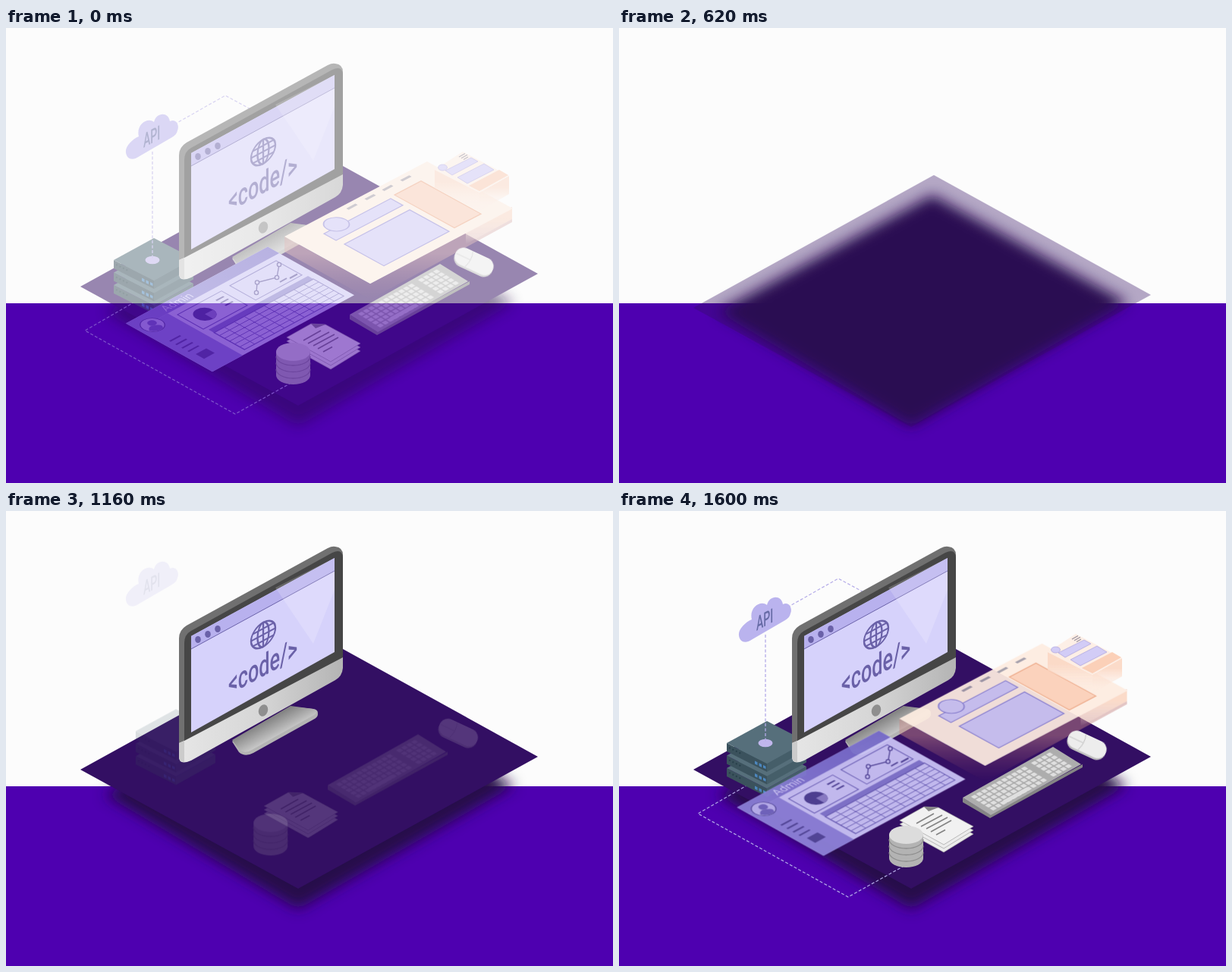
An HTML page without scripts that plays this animation: 800 px wide and 600 px high, repeating every 1650 ms.

```html
<!DOCTYPE html>
<html lang="en">
<head>
<meta charset="utf-8">
<title>Isometric desk</title>
<style>
  html, body { margin: 0; width: 100%; height: 100%; overflow: hidden; background: #fcfcfc; }
  svg { display: block; width: 100%; height: 100%; }
  text { font-family: Roboto, "Liberation Sans", sans-serif; }

  .scene, .shadow, .plate, .monitor, .item, .panel, .dash {
    animation: 1.65s linear infinite;
  }
  .scene { animation-name: leave; }
  .shadow { animation-name: shade; }
  .plate { animation-name: rise; }
  .monitor { --x: -40px; --y: -24.5px; animation-name: monitor; }
  .item { animation-name: item; }
  .panel { animation-name: panel; }
  .dash { animation-name: dash; }

  @keyframes leave {
    0% { opacity: .5; }
    1.82% { opacity: .36; }
    5.45% { opacity: .17; }
    9.1% { opacity: .06; }
    12.7%, 14.9% { opacity: 0; }
    15%, 100% { opacity: 1; }
  }
  @keyframes shade {
    0%, 14.9% { opacity: 1; }
    15%, 26.7% { opacity: 0; }
    36.4%, 100% { opacity: 1; }
  }
  @keyframes rise {
    0%, 14.9% { opacity: 1; transform: none; }
    15%, 35.7% { opacity: 0; transform: translateY(29.5px); }
    36.4% { opacity: .15; transform: translateY(29.5px); animation-timing-function: ease-in-out; }
    40% { opacity: 1; transform: translateY(23px); animation-timing-function: ease-out; }
    50.3%, 100% { opacity: 1; transform: none; }
  }
  @keyframes monitor {
    0%, 14.9% { opacity: 1; transform: none; }
    15%, 50.3% { opacity: 0; transform: translate(var(--x), var(--y)); animation-timing-function: ease-in-out; }
    65.5%, 100% { opacity: 1; transform: none; }
  }
  @keyframes item {
    0%, 14.9% { opacity: 1; transform: none; }
    15%, 66.7% { opacity: 0; transform: translate(var(--x), var(--y)); animation-timing-function: ease-in-out; }
    79.4%, 100% { opacity: 1; transform: none; }
  }
  @keyframes panel {
    0%, 14.9% { opacity: 1; transform: none; }
    15%, 83% { opacity: 0; transform: translate(var(--x), var(--y)); animation-timing-function: ease-in-out; }
    100% { opacity: 1; transform: none; }
  }
  @keyframes dash {
    0%, 14.9% { opacity: 1; }
    15%, 89% { opacity: 0; }
    97%, 100% { opacity: 1; }
  }
</style>
</head>
<body>
<svg viewBox="0 0 800 600" preserveAspectRatio="none">
  <defs>
    <clipPath id="stage"><path d="M0 46H800V600H0z"/></clipPath>
    <filter id="soft" x="-10%" y="-10%" width="120%" height="120%"><feGaussianBlur stdDeviation="9"/></filter>
    <linearGradient id="chin"><stop stop-color="#e6e6e6"/><stop offset=".5" stop-color="#d6d6d6"/><stop offset="1" stop-color="#b4b4b4"/></linearGradient>
    <linearGradient id="foot" gradientUnits="userSpaceOnUse" x1="345" y1="272" x2="360" y2="300">
      <stop stop-color="#7c7c7c"/><stop offset="1" stop-color="#d2d2d2"/>
    </linearGradient>
    <linearGradient id="admin"><stop stop-color="#8d82d8"/><stop offset="1" stop-color="#7468c8"/></linearGradient>
    <linearGradient id="edge" x2="0" y2="1">
      <stop offset=".5" stop-color="#c98a88" stop-opacity=".5"/><stop offset="1" stop-color="#8a3f60" stop-opacity="0"/>
    </linearGradient>
    <linearGradient id="peach" x2="0" y2="1">
      <stop offset=".3" stop-color="#fbd9c6"/><stop offset="1" stop-color="#fde9de" stop-opacity="0"/>
    </linearGradient>
    <pattern id="cells" width="13.1" height="6.7" patternUnits="userSpaceOnUse" x="48" y="68">
      <path d="M0 0H13.1M0 0V6.7" fill="none" stroke="#6c61b8" stroke-width="1.6"/>
    </pattern>
    <pattern id="keys" width="6.6" height="6.2" patternUnits="userSpaceOnUse" x="6" y="3.5">
      <rect x=".6" y=".6" width="5" height="4.6" rx=".8" fill="#dfdfdf"/>
    </pattern>
    <g id="slab">
      <path d="M142 306L195 333V344L142 317z" fill="#3b525d"/>
      <path d="M247 304L195 333V344L247 315z" fill="#455e69"/>
      <path d="M142 306L195 277L247 304L195 333z" fill="#566f7b"/>
      <path d="M179 329.500l3.500 1.800v4l-3.500-1.800zM184.500 332.300l3.500 1.800v4l-3.500-1.800zM190 335l3.500 1.800v3.500l-3.500-1.800z" fill="#4c86bd"/>
      <path d="M145 312l16 8" stroke="#28404a" stroke-width="2" stroke-dasharray="2 3"/>
    </g>
    <path id="sheet" d="M370 408L402 390L421 391L467 416L428 440z"/>
  </defs>

  <rect width="800" height="600" fill="#fcfcfc"/>
  <rect y="363" width="800" height="237" fill="#4e00b0"/>

  <g clip-path="url(#stage)">
  <g class="scene">
    <path class="shadow" d="M130 374L413 220L670 362L385 525z" fill="#270c48" filter="url(#soft)"/>
    <path class="plate" d="M98 341L415 166L701 324L385 498z" fill="#330f63"/>

    <g class="dash" fill="none" stroke="#b4abe8" stroke-width="1.2" stroke-dasharray="4 2.500">
      <path d="M222 127L289 89L326 109M170 361L104 399L302 509L374 469"/>
    </g>

    <g class="item" style="--x:35px;--y:-19px">
      <use href="#slab" y="33"/>
      <use href="#slab" y="16.500"/>
      <use href="#slab"/>
    </g>

    <g class="dash">
      <ellipse cx="193" cy="306" rx="9.500" ry="5.200" fill="#c0b6ec"/>
      <path d="M193 163V305" stroke="#b4abe8" stroke-width="1.300" stroke-dasharray="4 2.500"/>
    </g>

    <g class="item" style="--x:0px;--y:-57px">
      <path d="M158 164C157 156 166 147 175 143C171 127 187 117 195 124C198 111 214 110 216 123C224 119 229 128 226 135C225 140 222 142 219 144L176 169C168 175 159 174 158 164z" fill="#bab3ee"/>
      <text transform="matrix(.54 -.29 0 1 181 158)" font-size="26" font-weight="500" fill="#676ba6">API</text>
    </g>

    <g class="monitor">
      <path d="M298 304L375 258L405 261Q412 262 411 268Q411 272 405 275L326 319Q315 325 307 318z" fill="#b4b4b4"/>
      <path d="M298 302L375 257L405 261Q413 264 406 269L324 315Q314 321 307 314z" fill="url(#foot)"/>
      <path d="M228 312V168Q228 157 238 151L424 49Q430 46 434 47Q444 48 444 58V196z" fill="#707070"/>
      <path d="M235 307V174Q235 163 244 158L430 55Q443 49 444 61V196z" fill="#464646"/>
      <path d="M228 306L235 303L444 193V207Q443 218 434 223L244 329Q228 336 228 324z" fill="url(#chin)"/>
      <path d="M228 306L235 303V331Q228 331 228 324z" fill="#cbcbcb"/>
      <ellipse cx="339" cy="263" rx="6" ry="8" transform="rotate(20 339 263)" fill="#8f8f8f"/>
      <path d="M244 165L433 62V186L244 292z" fill="#d6d2fb"/>
      <path d="M244 165L433 62V79L244 182z" fill="#b8b1ee"/>
      <path d="M244 182L433 79" stroke="#6c63ab"/>
      <path d="M355 101L405 175L433 104V62z" fill="#fff" opacity=".18"/>
      <g fill="#6a61a8">
        <ellipse cx="253" cy="169.500" rx="3.800" ry="4.500"/>
        <ellipse cx="266" cy="162.500" rx="3.800" ry="4.500"/>
        <ellipse cx="279" cy="155.500" rx="3.800" ry="4.500"/>
        <text transform="matrix(.63 -.343 0 1 293 243)" font-size="40" font-weight="500">&lt;code/&gt;</text>
      </g>
      <g transform="matrix(1 -.545 0 1 339 163)" fill="none" stroke="#6a61a8" stroke-width="2.300">
        <circle r="16"/>
        <ellipse rx="7.500" ry="16"/>
        <path d="M0-16V16M-16 0H16M-13.500-8H13.500M-13.500 8H13.500"/>
      </g>
    </g>

    <g class="panel" style="--x:40px;--y:-20px">
      <path d="M367 275L480 338L667 236V256L480 358L367 295z" fill="url(#edge)"/>
      <path d="M606 269L667 236V252L606 285z" fill="url(#peach)"/>
      <g transform="matrix(1 -.527 1 .55 367 275)" stroke-width="1.300">
        <rect width="188" height="113" fill="#fdece1"/>
        <g fill="#cfc9f6" stroke="#9189d6">
          <rect x="30" y="22" width="88" height="16"/>
          <circle cx="50" cy="18.500" r="12"/>
          <rect x="31" y="48" width="86" height="52"/>
        </g>
        <rect x="125" y="20" width="35" height="79" fill="#fbcfb8" stroke="#eeaa88"/>
        <path d="M76 7h12m12 0h12m11 0h12m12 0h12" stroke="#a29ca8" stroke-width="3.200"/>
      </g>
    </g>

    <g class="panel" style="--x:0px;--y:-16px">
      <path d="M565 187L624 217V241L565 211z" fill="url(#peach)"/>
      <path d="M663 195L624 217V241L663 219z" fill="url(#peach)"/>
      <path d="M565 187L602 163L663 195L624 217z" fill="#fdeee5"/>
      <path d="M610 208L650 187L662 194L624 215z" fill="#fbcdb4"/>
      <g fill="#cfc9f6" stroke="#a59ddd" stroke-width=".7">
        <path d="M579 188L613 171L622 176L588 194zM595 197L630 179L643 187L608 205z"/>
        <ellipse cx="575.500" cy="184" rx="6" ry="4"/>
      </g>
      <path d="M597 170l8-4.500m-5 6.200l8-4.500m-5 6.200l6-3.500" stroke="#918a98" stroke-width="1.200"/>
    </g>

    <g class="panel" style="--x:-40px;--y:22px">
      <g transform="matrix(1 -.54 1 .56 158 389.500)">
        <rect width="187" height="114" fill="#cbc5f7"/>
        <rect width="187" height="15" fill="url(#admin)"/>
        <rect y="15" width="40" height="99" fill="#8f84da"/>
        <text x="41" y="12" font-size="13" fill="#d3ccfa">Admin</text>
        <g fill="none" stroke="#6c61b8" stroke-width="1.100">
          <rect x="45" y="23" width="58" height="34"/>
          <rect x="115" y="22" width="61" height="34"/>
        </g>
        <circle cx="16" cy="19" r="11.500" fill="#bdb5f0" stroke="#5a4f9e"/>
        <circle cx="18" cy="16.500" r="4.500" fill="#7468c0"/>
        <path d="M7 24Q11 17 18 21.500Q24 25 19 30Q11 31 7 24z" fill="#7468c0"/>
        <circle cx="64" cy="40" r="11" fill="#4f4394"/>
        <path d="M64 40L75 40A11 11 0 0 1 64 51z" fill="#8d81c8"/>
        <path d="M88 31h10M88 37h10M88 43h10M8 50h14M8 58h14M8 66h14M8 74h14" stroke="#55499a" stroke-width="2"/>
        <rect x="10" y="82" width="14" height="11" fill="#55499a"/>
        <rect x="48" y="61" width="131" height="7" fill="#8378cd"/>
        <rect x="48" y="68" width="131" height="40.200" fill="url(#cells)"/>
        <rect x="48" y="68" width="131" height="40.200" fill="none" stroke="#6c61b8"/>
      </g>
      <g stroke="#55499a" fill="none" stroke-width="1.400">
        <path d="M330 349L331 335.500L357 329L360 312"/>
        <path d="M361 335l9-5m4 0l10-5.500" stroke-width="2"/>
        <g fill="#cbc5f7">
          <circle cx="330" cy="349" r="2.600"/><circle cx="331" cy="335.500" r="2.600"/>
          <circle cx="357" cy="329" r="2.600"/><circle cx="360" cy="312" r="2.600"/>
        </g>
      </g>
    </g>

    <g class="item" style="--x:-35px;--y:-20px">
      <path d="M453 378L489 400L611 334V338L489 405L453 384z" fill="#858585"/>
      <g transform="matrix(1 -.563 1 .62 453 378)">
        <rect width="119" height="37" fill="#adadad"/>
        <rect x="6" y="3.500" width="72.600" height="31" fill="url(#keys)"/>
        <rect x="85.200" y="3.500" width="26.400" height="31" fill="url(#keys)"/>
        <rect x="24" y="28.500" width="32" height="4.800" rx="1" fill="#dfdfdf"/>
      </g>
    </g>

    <g class="item" style="--x:-25px;--y:-19px">
      <g transform="translate(616.500 309) rotate(25)">
        <rect x="-27" y="-11" width="54" height="24" rx="12" fill="#bdbdbd"/>
        <rect x="-27" y="-13" width="54" height="23.500" rx="11.700" fill="#ededed"/>
        <path d="M-7-12.500Q-3-2-8 10M-26-1H-6" fill="none" stroke="#c4c4c4"/>
      </g>
    </g>

    <g class="item" style="--x:-36px;--y:-23px">
      <g fill="#ececec" stroke="#a2a2a2" stroke-width=".7">
        <use href="#sheet" y="10"/>
        <use href="#sheet" y="5"/>
        <use href="#sheet" fill="#f1f1f1"/>
      </g>
      <path d="M402 390L421 391L408 396z" fill="#858585"/>
      <path d="M392 412l23-13M398 416l28-15M405 419l28-15M411 423l27-15M418 427l12-6.500" stroke="#858585" stroke-width="1.700"/>
    </g>

    <g class="item" style="--x:-36px;--y:-19px">
      <path d="M356 427V458A22.500 12 0 0 0 401 458V427z" fill="#b3b3b3"/>
      <g fill="none" stroke="#8e8e8e" stroke-width="1.300">
        <path id="ring" d="M356 433A22.500 12 0 0 0 401 433"/>
        <use href="#ring" y="8.500"/>
        <use href="#ring" y="17"/>
      </g>
      <ellipse cx="378.500" cy="427" rx="22.500" ry="12" fill="#dcdcdc"/>
    </g>
  </g>
  </g>
</svg>
</body>
</html>
```
